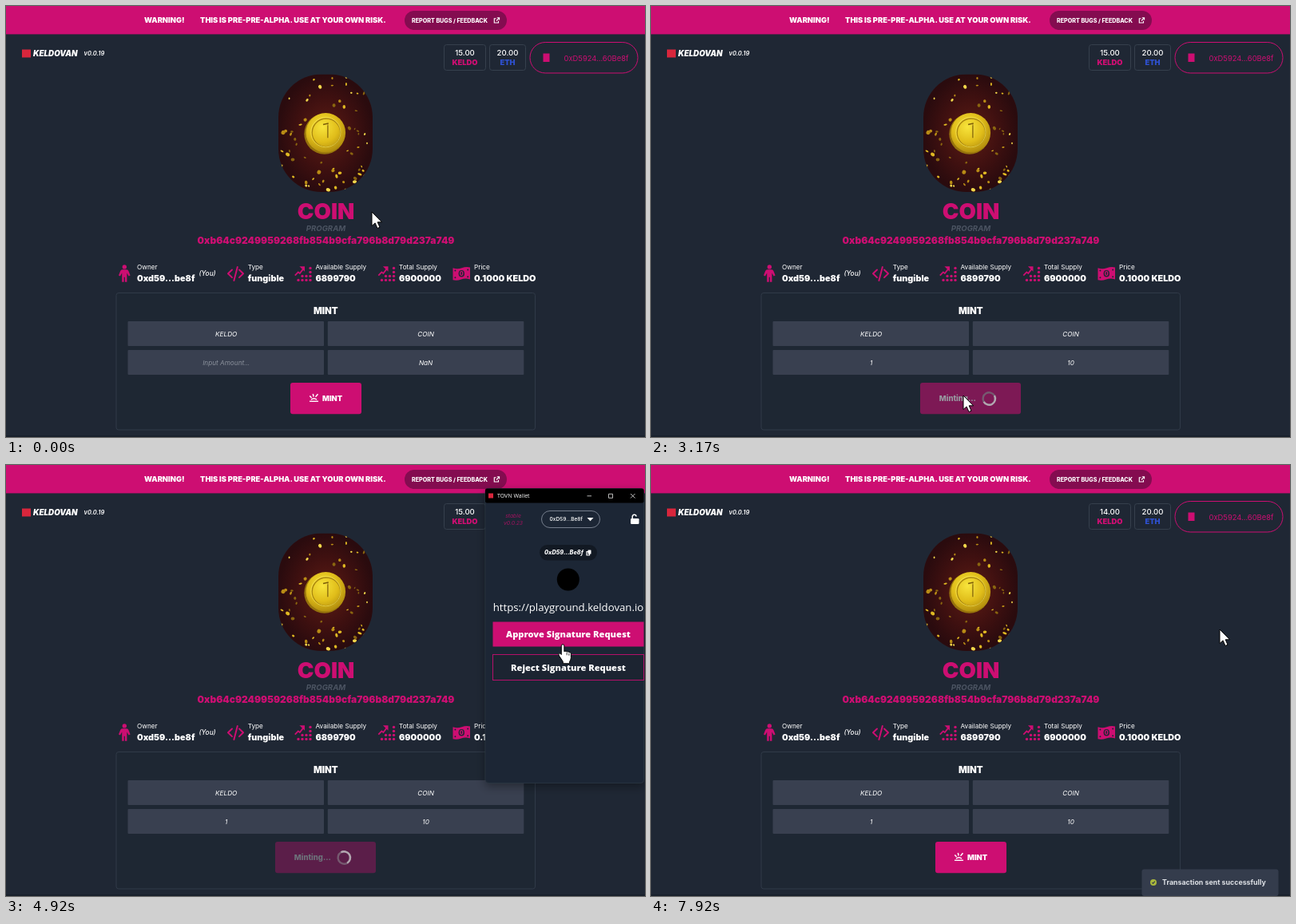
Recreate the animation shown at these times as an HTML page. Size 800 px wide and 540 px high, loop 8 s.

```html
<!DOCTYPE html>
<html lang="en">
<head>
<meta charset="utf-8">
<title>Mint</title>
<style>
html, body { margin: 0; width: 100%; height: 100%; overflow: hidden; background: #1f2734; }
svg { display: block; width: 100vw; height: 100vh; }
text { font-family: Inter, sans-serif; white-space: pre; }
.seg { font-family: "Open Sans", "Noto Sans", sans-serif; }
</style>
</head>
<body>
<svg id="stage" viewBox="0 0 800 540"></svg>
<script>
const LOOP = 8000, STEP = 1000 / 12;
const PINK = '#cd0e72', BG = '#1f2734', LINE = '#36404d', FIELD = '#394050';
const stage = document.getElementById('stage');

// Markup helpers
const text = (s, x, y, size, o = {}) =>
  `<text x="${x}" y="${y}" font-size="${size}" font-weight="${o.w || 400}" fill="${o.fill || '#fff'}"` +
  ` text-anchor="${o.a || 'start'}"${o.it ? ' font-style="italic"' : ''}` +
  `${o.cls ? ` class="${o.cls}"` : ''}${o.id ? ` id="${o.id}"` : ''}>${s}</text>`;
const mid = (s, x, y, size, o = {}) => text(s, x, y, size, { ...o, a: 'middle' });
const rect = (x, y, w, h, r, fill, extra = '') =>
  `<rect x="${x}" y="${y}" width="${w}" height="${h}" rx="${r}" fill="${fill}" ${extra}/>`;
const path = (d, stroke, w, extra = '') =>
  `<path d="${d}" fill="none" stroke="${stroke}" stroke-width="${w}" ${extra}/>`;
const dot = (x, y, r, fill, extra = '') => `<circle cx="${x}" cy="${y}" r="${r}" fill="${fill}" ${extra}/>`;
const outline = color => `stroke="${color}"`;

function random(seed) {
  return () => (seed = (seed * 16807) % 2147483647) / 2147483647;
}

function banner() {
  return rect(0, 0, 800, 35.4, 0, PINK) +
    text('WARNING!', 173, 21.3, 9.3, { w: 900 }) +
    text('THIS IS PRE-PRE-ALPHA. USE AT YOUR OWN RISK.', 243, 21.3, 9.3, { w: 900 }) +
    rect(499, 6, 128, 24, 12, '#840c50') +
    text('REPORT BUGS / FEEDBACK', 508, 20.5, 7.15, { w: 800 }) +
    path('M613.5 15.8h-2.2v5.2h5.2v-2.2M614 18.5l3.2-3.4M614.8 14.7h2.8v2.8', '#fff', 1.1);
}

function topBar() {
  return rect(20, 54.5, 11, 10, 0, '#d8263c') +
    text('KELDOVAN', 34, 62.8, 9.8, { w: 900, it: 1 }) +
    text('v0.0.19', 97.5, 62, 7.5, { w: 600, it: 1 }) +
    rect(548.5, 48.5, 52, 32, 3, 'none', outline(LINE)) +
    mid('15.00', 574.5, 62, 9.6, { w: 500, id: 'balance' }) +
    mid('KELDO', 574.5, 74.4, 9.3, { w: 900, fill: PINK }) +
    rect(605.5, 48.5, 45, 32, 3, 'none', outline(LINE)) +
    mid('20.00', 628, 62, 9.6, { w: 500 }) +
    mid('ETH', 628, 74.4, 9.3, { w: 900, fill: '#2e50cf' }) +
    rect(656, 45.5, 135, 38.5, 19.2, 'none', outline(PINK)) +
    rect(672.5, 59.5, 8, 10.5, 0, PINK) +
    mid('0xD5924...60Be8f', 739, 68.6, 9.4, { fill: PINK });
}

function coinArt() {
  const rnd = random(77), gold = ['#e0b922', '#b98c15', '#f0d64a', '#8a650f'];
  let specks = '';
  for (let i = 0; i < 90; i++) {
    const x = 343 + rnd() * 114, y = 88 + rnd() * 143, size = 1.2 + rnd() * 1.5;
    const flat = 0.45 + rnd() * 0.5, turn = rnd() * 180, color = gold[i % 4];
    if (Math.hypot(x - 399.5, y - 159.5) < 30) continue;
    specks += `<ellipse rx="${size}" ry="${size * flat}" fill="${color}" transform="translate(${x} ${y}) rotate(${turn})"/>`;
  }
  return `<g clip-path="url(#pill)">${rect(341, 85.5, 118, 147.5, 0, 'url(#wine)')}${specks}</g>` +
    dot(398.7, 160.3, 25.4, '#96730c') + dot(400.3, 158.8, 24.8, 'url(#gold)') +
    dot(401, 158.8, 17.8, 'none', 'stroke="#a8850e" stroke-width="1.3"') +
    dot(400.4, 158.2, 18.6, 'none', 'stroke="#f9e95c" stroke-width=".7"') +
    path('M397 148.5l6-1.3v18', '#7c5d08', 1.4) +
    path('M398.5 149.8l5.6-1.2v17', '#f0d640', 0.7);
}

function title() {
  return mid('COIN', 400.5, 266.7, 27.7, { w: 900, fill: PINK }) +
    mid('PROGRAM', 400.5, 282, 9.6, { w: 700, fill: '#4c5462', it: 1 }) +
    mid('0xb64c9249959268fb854b9cfa796b8d79d237a749', 400.5, 297.8, 12, { w: 900, fill: PINK });
}

function growthIcon(x) {
  let s = path(`M${x + 0.8} 337.6l4-4.2 2 1.6 4.2-5.4`, PINK, 1.8) +
    `<path d="M${x + 6.4} 326.2h6.6v6.6z" fill="${PINK}"/>`;
  [1, 2, 2, 4].forEach((n, col) => {
    for (let j = 0; j < n; j++) s += dot(x + 5 + col * 5, 343.4 - j * 5, 1.7, PINK);
  });
  return s;
}

function stat(x, label, value) {
  return text(label, x, 330, 8.2) + text(value, x, 345, 10.8, { w: 900 });
}

function stats() {
  const person = dot(148.3, 326.9, 2.7, PINK) +
    `<path d="M145.4 330.3h5.8q1.6.2 2.2 1.6l2.2 5.6-2 .9-2.2-3.8v11.2h-2.5v-6h-1.2v6h-2.5v-11.2l-2.2 3.8-2-.9 2.2-5.6q.6-1.4 2.2-1.6z" fill="${PINK}"/>`;
  const code = path('M283 330.5l-5 4.8 5 4.8M292 330.5l5 4.8-5 4.8M289.8 327l-4.4 17', PINK, 2,
    'stroke-linecap="round" stroke-linejoin="round"');
  const bill = `<path d="M559.5 328.2q5.5 2 11 0t10.5-.8v15q-5.5-2-11 0t-10.5.8z" fill="${PINK}"/>` +
    `<ellipse cx="570.3" cy="335.3" rx="3.7" ry="4.3" fill="${BG}"/>` +
    mid('0', 570.3, 338, 7.2, { w: 800, fill: PINK }) +
    dot(562.4, 331.4, 1, BG) + dot(578.2, 339.3, 1, BG) + dot(562.4, 340.2, 1, BG) + dot(578.2, 330.5, 1, BG);
  return person + stat(164, 'Owner', '0xd59...be8f') +
    text('(You)', 241.5, 338.2, 8.3, { w: 500, it: 1 }) +
    code + stat(302.7, 'Type', 'fungible') +
    growthIcon(361) + stat(387.5, 'Available Supply', '6899790') +
    growthIcon(465.5) + stat(492, 'Total Supply', '6900000') +
    bill + stat(586, 'Price', '0.1000 KELDO');
}

function card() {
  const field = (x, y) => rect(x, y, 245.5, 31, 1, FIELD);
  return rect(138, 359.5, 524.5, 171.5, 3, '#1e2733', outline('#303a48')) +
    mid('MINT', 400.3, 386, 11.4, { w: 900 }) +
    field(152.5, 395) + field(402.8, 395) + field(152.5, 431) + field(402.8, 431) +
    mid('KELDO', 275.7, 413.6, 8.2, { it: 1 }) +
    mid('COIN', 525.6, 413.6, 8.2, { it: 1 }) +
    mid('', 275.7, 450, 8.2, { it: 1, id: 'amount' }) +
    mid('', 525.6, 450, 8.2, { it: 1, id: 'result' }) +
    rect(0, 442, 0.9, 9.5, 0, '#fff', 'id="caret"');
}

function mintButton() {
  const spark = path('M380 495.3h11', '#fff', 1.4) +
    path('M382 493.3q3.5-3 7 0M380.3 488.5l2.3 2.5M384.3 486l.8 3.5M390.5 486.3l-3 3.5', '#fff', 1.5);
  return `<g id="ready">${rect(356, 472, 89, 39.3, 3, PINK)}${spark}${text('MINT', 396, 495.3, 9.3, { w: 900 })}</g>` +
    `<g id="busy">${rect(337, 472, 126, 39.3, 3, PINK)}${text('Minting...', 360.8, 495.3, 9.5, { w: 800 })}</g>` +
    `<g id="spinner">${dot(0, 0, 7.7, 'none', 'stroke="#765a70" stroke-width="2.4"')}` +
    `${path('M0-7.7A7.7 7.7 0 0 1 0 7.7', '#b3a6b0', 2.4)}</g>`;
}

function wallet() {
  const bar = rect(600, 29.5, 198.5, 18, 2, '#000') + rect(604, 35.5, 6, 6, 0, '#d8263c') +
    text('TOVN Wallet', 615, 41, 7, { cls: 'seg' }) +
    path('M727.5 38.8h5.5M754.5 36.3h5v5h-5zM782 36l5.5 5.5M787.5 36l-5.5 5.5', '#e8e8e8', 0.8);
  const account = mid('stable', 635, 66, 6.8, { it: 1, fill: '#a0135f' }) +
    mid('v0.0.23', 635, 75, 6.8, { it: 1, fill: '#a0135f' }) +
    rect(670.5, 57.5, 73, 21, 10.5, 'none', 'stroke="#8c95a3" stroke-width=".8"') +
    text('0xD59...Be8f', 680.5, 70.3, 6.6, { w: 500 }) +
    '<path d="M727.5 66h8l-4 4.3z" fill="#fff"/>' +
    rect(782, 67, 10.5, 7, 1.2, '#fff') + path('M784.2 67.5v-2.5a2.4 2.4 0 0 1 4.8-.5', '#fff', 1.5);
  const chip = rect(668, 100, 72, 19.5, 9.7, '#121923') +
    text('0xD59...Be8f', 674, 112.4, 7.3, { w: 800, it: 1 }) +
    path('M727 108.5h3.5v4.5h-3.5z', '#fff', 1.2) + rect(728.5, 106.5, 4, 5, 0.5, '#fff');
  const o = { w: 800, cls: 'seg' };
  return rect(600, 29.5, 198.5, 369, 4, BG, 'stroke="#2c3643" stroke-width=".8" filter="url(#shade)"') +
    bar + account + chip + dot(703.8, 143.5, 14, '#000') +
    mid('https://playground.keldovan.io', 704, 183, 13.2, { cls: 'seg' }) +
    rect(609.5, 196.5, 189, 31, 0, PINK, 'id="approve"') +
    mid('Approve Signature Request', 704, 216.3, 11.1, o) +
    rect(609.5, 237.5, 189, 32, 0, '#1c2431', outline('#b51069')) +
    mid('Reject Signature Request', 704, 258, 11.1, o);
}

function toast() {
  return rect(614.5, 506.5, 171, 33.5, 3, '#343c4c') +
    dot(629, 523, 4, '#a9b83c') + path('M627.3 523l1.3 1.4 2.2-2.8', '#343c4c', 1.1) +
    text('Transaction sent successfully', 640, 526.4, 8.85, { w: 700, fill: '#dfe2e7' });
}

function cursors() {
  const ink = d => `<path d="${d}" fill="#fff" stroke="#000" stroke-linejoin="round"/>`;
  const beam = 'M-5.5-9.5h11M0-9.5v19M-5.5 9.5h11';
  return `<g id="arrow">${ink('M0 0V17.5L4.1 13.9 7 20.5 10 19.2 7.2 12.8H12.6Z')}</g>` +
    `<g id="hand">${ink('M-1.7 1q0-2 1.8-2t1.8 2v7l1-.5q1.5-.5 2.2.8 1.5-.8 2.6.5 2.3-.5 2.7 1.5v5.5q-.3 3-1.8 4.8v2.4h-8.3v-2.4l-4.8-7.3q-1.5-2.6.3-3.2 1.3-.2 2.5 1.700z')}` +
    `${path('M5.2 9v3.5M7.9 10v3', '#000', 0.8)}</g>` +
    `<g id="beam">${path(beam, '#000', 3.4, 'stroke-linecap="square"')}${path(beam, '#fff', 1.3)}</g>`;
}

stage.innerHTML = `<defs>
  <clipPath id="pill"><rect x="341" y="85.5" width="118" height="147.5" rx="54"/></clipPath>
  <radialGradient id="wine"><stop stop-color="#5e1c14"/><stop offset=".6" stop-color="#3f1010"/><stop offset="1" stop-color="#2a0b0e"/></radialGradient>
  <radialGradient id="gold" cx=".42" cy=".35" r=".7"><stop stop-color="#f8e53c"/><stop offset=".55" stop-color="#e0bd1a"/><stop offset="1" stop-color="#aa850c"/></radialGradient>
  <filter id="shade" x="-20%" y="-10%" width="140%" height="120%"><feDropShadow dx="0" dy="4" stdDeviation="6" flood-color="#000" flood-opacity=".35"/></filter>
</defs>` + rect(0, 0, 800, 540, 0, BG) + rect(0, 538, 800, 2, 0, '#18202b') +
  banner() + topBar() + coinArt() + title() + stats() + card() + mintButton() +
  `<g id="toast">${toast()}</g><g id="wallet">${wallet()}</g><g id="cursor">${cursors()}</g>`;

const ui = {};
stage.querySelectorAll('[id]').forEach(node => ui[node.id] = node);
const set = (id, name, value) => ui[id].setAttribute(name, value);
const show = (id, on) => set(id, 'visibility', on ? 'visible' : 'hidden');
const clamp = v => Math.max(0, Math.min(1, v));
const ramp = (t, from, len) => clamp((t - from) / len);
const ease = v => v * v * (3 - 2 * v);

// Pointer stops: time, x, y
const stops = [
  [80, 458, 258], [830, 376, 428], [1420, 319, 450], [2000, 319, 450], [2170, 340, 474],
  [2330, 340, 474], [2830, 391, 488], [3950, 391, 488], [4500, 672, 258], [4700, 674, 256], [5080, 712, 206]
];
const at = { focus: 1650, typed: 1740, blur: 2980, click: 2990, open: 3660, approve: 5400, close: 5500, done: 7490, toast: 7570 };

function pointer(t) {
  const i = stops.findIndex(s => s[0] > t);
  if (i === 0) return stops[0].slice(1);
  if (i < 0) return stops[stops.length - 1].slice(1);
  const [t0, x0, y0] = stops[i - 1], [t1, x1, y1] = stops[i];
  const p = ease((t - t0) / (t1 - t0));
  return [x0 + (x1 - x0) * p, y0 + (y1 - y0) * p];
}

const inside = (x, y, l, t, r, b) => x > l && x < r && y > t && y < b;

function pointerKind(t, x, y, busy) {
  if (inside(x, y, 152, 431, 398, 462)) return 'beam';
  if (!busy && inside(x, y, 356, 472, 445, 511)) return 'hand';
  const walletUp = t > at.open && t < at.approve;
  if (walletUp && (inside(x, y, 610, 196, 798, 228) || inside(x, y, 610, 238, 798, 270))) return 'hand';
  return 'arrow';
}

function draw(t) {
  const busy = t >= at.click && t < at.done, typed = t >= at.typed, approved = t >= at.approve;

  ui.balance.textContent = t < at.done ? '15.00' : '14.00';
  ui.amount.textContent = typed ? '1' : 'Input Amount...';
  set('amount', 'fill', typed ? '#fff' : '#8a909b');
  ui.result.textContent = typed ? '10' : 'NaN';
  show('caret', t >= at.focus && t < at.blur && (t - at.focus) % 1000 < 500);
  set('caret', 'x', typed ? 277.3 : 275.3);

  show('ready', !busy);
  show('busy', busy);
  show('spinner', busy);
  set('busy', 'opacity', 1 - 0.65 * ramp(t, at.click, 250));
  set('ready', 'opacity', t < at.click ? 1 : 0.35 + 0.65 * ramp(t, at.done, 250));
  set('spinner', 'transform', `translate(423.3 492) rotate(${t * 0.36 % 360})`);

  const opened = ease(ramp(t, at.open, 220)), closed = ramp(t, at.close, 245);
  const scale = 1 - 0.08 * (1 - opened) - 0.04 * closed;
  show('wallet', opened > 0 && closed < 1);
  set('wallet', 'opacity', opened * (1 - closed));
  set('wallet', 'transform', `translate(700 214) scale(${scale}) translate(-700 -214)`);
  set('approve', 'fill', approved ? '#7d0d4b' : PINK);
  set('approve', 'stroke', approved ? '#fff' : 'none');

  const risen = 1 - (1 - ramp(t, at.toast, 350)) ** 3;
  show('toast', risen > 0);
  set('toast', 'opacity', risen);
  set('toast', 'transform', `translate(0 ${40 * (1 - risen)})`);

  const [x, y] = pointer(t), kind = pointerKind(t, x, y, busy);
  set('cursor', 'transform', `translate(${x} ${y})`);
  ['arrow', 'hand', 'beam'].forEach(id => show(id, id === kind));
}

const start = performance.now();
function tick() {
  const t = (performance.now() - start) % LOOP;
  draw(Math.min(95, Math.floor((t + 4) / STEP)) * STEP);
  requestAnimationFrame(tick);
}
tick();
</script>
</body>
</html>
```
